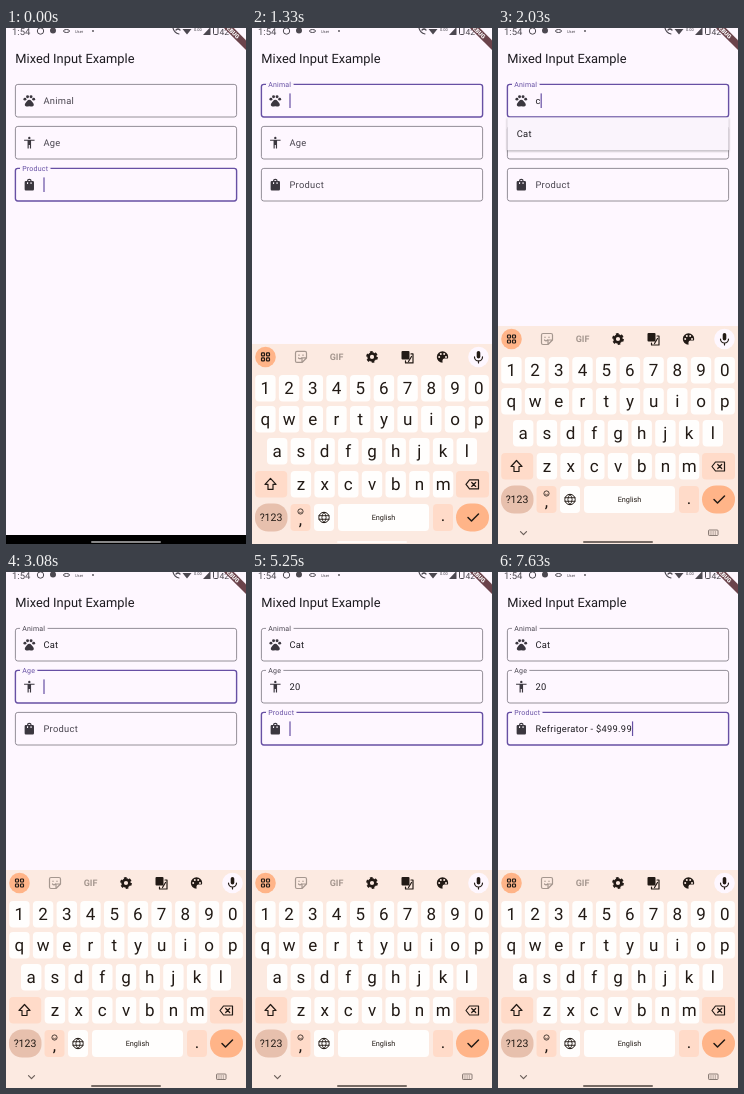
An HTML page that plays this animation: 240 by 516 pixels, repeating every 8050 ms.

```html
<!DOCTYPE html>
<html lang="en">
<head>
<meta charset="utf-8">
<title>Mixed Input Example</title>
<style>
html, body { margin: 0; width: 100%; height: 100%; overflow: hidden; background: #fef7ff; }
svg { display: block; width: 100%; height: 100%; font-family: Roboto, sans-serif; text-rendering: geometricPrecision; }
.body { font-size: 9.34px; letter-spacing: .29px; fill: #1d1b20; }
.mid { text-anchor: middle; }
.key { font-size: 17px; text-anchor: middle; fill: #221a15; }
.line { fill: none; stroke: #221a15; stroke-width: 1.2; stroke-linejoin: round; stroke-linecap: round; }
#menu rect { filter: drop-shadow(0 1px 1.2px #0005); }
</style>
</head>
<body>
<svg id="stage" viewBox="0 0 240 516"></svg>
<script>
const PAGE = '#fef7ff', PURPLE = '#6750a4', GREY = '#49454f', INK = '#221a15';
const KEY = '#fffefd', TONAL = '#ffdbc9', ORANGE = '#ffb488', PEACH = '#fceae1';
const LOOP = 8050, STEP = 70, TEXT_X = 37.4;

// Timelines are lists of [start, value].
const focusLine = [[-1000, 2], [1120, 0], [2940, 1], [4200, 2]];
const cursorOff = [[350, 770], [3360, 3570], [4760, 5250], [6090, 6230], [6580, 6930], [7140, 7560]];
const menus = [[1890, 2450, 0, 'Cat'], [5600, 6930, 2, 'Refrigerator - $499.99']];
const fields = [
  { name: 'Animal', typed: [[0, ''], [1820, 'c'], [2450, 'Cat']],
    icon: '<circle cx="4.5" cy="9.5" r="2.5"/><circle cx="9" cy="5.5" r="2.5"/><circle cx="15" cy="5.5" r="2.5"/><circle cx="19.5" cy="9.5" r="2.5"/><path d="M12 10.5c-3 0-4 3-6.5 5.5-2 2-1.5 6 1.5 6 1.5 0 3-.5 5-.5s3.5.5 5 .5c3 0 3.5-4 1.5-6-2.5-2.500-3.500-5.500-6.500-5.500z"/>' },
  { name: 'Age', typed: [[0, ''], [3570, '2'], [3780, '20']],
    icon: '<circle cx="12" cy="4" r="2"/><path d="M21 9h-6v13h-2v-6h-2v6H9V9H3V7h18z"/>' },
  { name: 'Product', typed: [[0, ''], [5530, 'r'], [6230, 're'], [6930, 'Refrigerator - $499.99']],
    icon: '<path d="M18 6h-2a4 4 0 0 0-8 0H6a2 2 0 0 0-2 2v12a2 2 0 0 0 2 2h12a2 2 0 0 0 2-2V8a2 2 0 0 0-2-2zM12 4a2 2 0 0 1 2 2h-4a2 2 0 0 1 2-2zM10 10a1 1 0 0 1-2 0V8h2zM16 10a1 1 0 0 1-2 0V8h2z" fill-rule="evenodd"/>' }
];

const rect = (x, y, w, h, fill, r = 0, more = '') =>
  `<rect x="${x}" y="${y}" width="${w}" height="${h}" rx="${r}" fill="${fill}" ${more}/>`;
const dot = (x, y, r, fill, more = '') => `<circle cx="${x}" cy="${y}" r="${r}" fill="${fill}" ${more}/>`;
const label = (x, y, s, more = 'class="body"') => `<text x="${x}" y="${y}" ${more}>${s}</text>`;
const line = (d, more = '') => `<path class="line" d="${d}" ${more}/>`;
const fieldY = i => 56.4 + 42 * i;

function statusBar() {
  const c = '#4c4850', small = `font-size="4" fill="${c}"`;
  return label(6, 7, '1:54', `font-size="9.5" fill="${c}"`) +
    dot(34.5, 3, 3.2, 'none', `stroke="${c}"`) + dot(47, 2.5, 3, c) +
    `<ellipse cx="60.5" cy="3" rx="3" ry="1.5" fill="none" stroke="${c}"/>` +
    label(69, 4.5, 'User', small) + dot(87, 3, .9, c) +
    line('M167 0q1 5 6 6M170 2q2-2 4 0', `style="stroke:${c}"`) +
    `<path d="M176.5 1h9l-4.5 5.5zM197 7h7.5V-1z" fill="${c}"/>` +
    label(188, 3, '0.00', small) +
    rect(207.5, -1, 4.5, 7.5, 'none', 1, `stroke="${c}"`) +
    label(213.5, 6.5, '42', `font-size="8.5" fill="${c}"`) +
    '<g transform="translate(240 -11) rotate(45)">' + rect(-24, 16.4, 48, 7, '#6b434b') +
    label(0, 22, 'DEBUG', 'class="mid" font-size="5.8" font-weight="900" fill="#fff"') + '</g>';
}

function fieldMarkup({ name, icon }, i) {
  const y = fieldY(i);
  return rect(9.4, y, 221.2, 32.6, 'none', 2.4, `id="box${i}"`) +
    rect(14, y - 1.2, 0, 2.4, PAGE, 0, `id="gap${i}"`) +
    `<g transform="translate(16.3 ${y + 9.2}) scale(.584)" fill="#3b373f">${icon}</g>` +
    `<text class="body" id="label${i}">${name}</text>` +
    label(TEXT_X, y + 19.4, '', `class="body" id="value${i}"`);
}

function keyRow(chars, x, y) {
  return [...chars].map((c, i) => {
    const cx = x + 23.7 * i;
    return rect(cx - 10.2, y - 13, 20.4, 26.5, KEY, 4) + label(cx, y + 5.8, c, 'class="key"');
  }).join('');
}

function toolRow() {
  const fade = 'style="stroke:#a5978f"';
  const squares = [[9.5, 307], [14.5, 307], [9.5, 312], [14.5, 312]];
  const wells = [[187.2, 311], [188.8, 308], [192.2, 308], [194, 311]];
  return dot(13.5, 311, 10.3, ORANGE) +
    squares.map(([x, y]) => rect(x, y, 3, 3, 'none', .8, `stroke="${INK}" stroke-width="1.2"`)).join('') +
    line('M45 305.5h8q1.5 0 1.5 1.5v5l-4.5 4.5h-5q-1.5 0-1.5-1.5v-8q0-1.5 1.5-1.5M54 312h-4v4M47 309v.5M51 309v.5M46.5 312q1.5 1.5 3 0', fade) +
    label(84.5, 314.2, 'GIF', 'class="mid" font-size="9" font-weight="700" fill="#a5978f"') +
    dot(120, 311, 3.4, 'none', `stroke="${INK}" stroke-width="2.6"`) +
    dot(120, 311, 4.9, 'none', `stroke="${INK}" stroke-width="2" stroke-dasharray="2.6 2.53"`) +
    rect(149.5, 305, 8, 8.5, INK, 1) + line('M159 308h2v9h-7.5v-2M156.5 315.5l3-5') +
    dot(190.5, 311, 5.7, INK) + wells.map(([x, y]) => dot(x, y, 1, PEACH)).join('') +
    `<path d="M190.5 317.5v-3q0-2 2-2h4v5z" fill="${PEACH}"/>` +
    dot(226.5, 311, 10.3, PAGE) + rect(224.7, 305, 3.6, 7.5, INK, 1.8) +
    line('M222.5 311a4 4 0 0 0 8 0M226.5 315v2');
}

function keyboard() {
  return rect(0, 298, 240, 240, PEACH) + toolRow() +
    keyRow('1234567890', 13.4, 342) + keyRow('qwertyuiop', 13.4, 373) +
    keyRow('asdfghjkl', 25.2, 405) + keyRow('zxcvbnm', 48.9, 438) +
    rect(3.2, 425, 32, 26.5, TONAL, 4) + line('M18.5 432.5l5.5 6h-3v5h-5v-5h-3z') +
    rect(204, 425, 33, 26.5, TONAL, 4) + line('M214 438.5l3.5-4.5h9v9h-9zM219.7 436.5l4 4M223.7 436.5l-4 4') +
    rect(3, 457.5, 32.5, 28, '#e7c0ad', 13) + label(19, 475, '?123', 'class="mid" font-size="10.5" fill="#221a15"') +
    rect(38.5, 458, 20, 27, TONAL, 4) + dot(48.5, 465.5, 2.6, 'none', `stroke="${INK}" stroke-width=".8"`) +
    line('M47.2 466.2q1.3 1.2 2.6 0', 'style="stroke-width:.6"') + label(48.5, 479, ',', 'class="key"') +
    rect(62, 458, 20, 27, KEY, 4) + dot(72, 471.5, 5.2, 'none', `stroke="${INK}"`) +
    line('M67 469.7h10M67 473.3h10M72 466.3q-4.5 5.2 0 10.4M72 466.3q4.5 5.2 0 10.4', 'style="stroke-width:.9"') +
    rect(86, 458, 91, 27, KEY, 4) + label(131.5, 474, 'English', 'class="mid" font-size="7.3" fill="#221a15"') +
    rect(181, 458, 20, 27, TONAL, 4) + label(191, 475.5, '.', 'class="key"') +
    rect(204, 457.5, 33, 28, ORANGE, 14) + line('M216 471.5l3.5 3.5 7-7', 'style="stroke-width:1.5"') +
    line('M22.5 503.7l3 3 3-3', 'style="stroke:#6b5f59"') +
    rect(210.5, 502, 9.5, 5.5, 'none', .8, 'stroke="#6b5f59" stroke-width=".8"') +
    line('M212 504h7M212 506h7', 'style="stroke:#6b5f59;stroke-width:.8;stroke-dasharray:.3 1.5"');
}

const $ = id => document.getElementById(id);
const set = (id, attrs) => { for (const k in attrs) $(id).setAttribute(k, attrs[k]); };
const show = (id, on) => { $(id).style.display = on ? '' : 'none'; };
const clamp = v => Math.max(0, Math.min(1, v));
const lastIndex = (list, t) => list.filter(e => e[0] <= t).length - 1;

$('stage').innerHTML = rect(0, 0, 240, 516, PAGE) + statusBar() +
  label(9.3, 34.5, 'Mixed Input Example', 'font-size="12.85" fill="#1d1b20"') +
  fields.map(fieldMarkup).join('') + rect(0, 0, 1.2, 14.6, PURPLE, 0, 'id="cursor"') +
  '<g id="menu">' + rect(9.3, 0, 221.4, 32.8, '#faf4fc') + label(18.7, 19.4, '', 'class="body" id="option"') + '</g>' +
  rect(0, 507, 240, 9, '#000', 0, 'id="navBar"') +
  `<g id="keyboard">${keyboard()}</g>` + rect(85, 513, 70, 2, '#888', 1, 'id="handle"');

function draw(t) {
  const n = lastIndex(focusLine, t);
  const [since, active] = focusLine[n];
  const before = n ? focusLine[n - 1][1] : -1;
  const rise = clamp((t - since + 70) / 140);

  fields.forEach((f, i) => {
    const value = f.typed[lastIndex(f.typed, t)][1], y = fieldY(i), on = active === i;
    const p = value ? 1 : on ? rise : before === i ? 1 - rise : 0;
    $('value' + i).textContent = value;
    set('box' + i, { stroke: on ? PURPLE : '#79747e', 'stroke-width': on ? 1.4 : .8 });
    set('label' + i, {
      transform: `translate(${TEXT_X - 21.2 * p} ${y + 19.4 - 16.9 * p}) scale(${1 - .25 * p})`,
      style: `fill:${on ? PURPLE : GREY}`
    });
    set('gap' + i, { width: p * ($('label' + i).getComputedTextLength() * .75 + 4.5) });
  });

  const typed = $('value' + active);
  const width = typed.textContent ? typed.getComputedTextLength() : 0;
  set('cursor', { x: TEXT_X + width, y: fieldY(active) + 9 });
  show('cursor', !cursorOff.some(([a, b]) => t >= a && t < b));

  const menu = menus.find(([a, b]) => t >= a && t < b);
  show('menu', menu);
  if (menu) {
    set('menu', { transform: `translate(0 ${fieldY(menu[2]) + 33})` });
    $('option').textContent = menu[3];
  }

  const drop = 218 * (1 - clamp((t - 1147) / 324)) ** 3;
  set('keyboard', { transform: `translate(0 ${drop})` });
  show('navBar', t < 1190);
  set('handle', { fill: t < 1190 ? '#888' : t < 1610 ? '#fffaf7' : '#776b65' });
}

const begin = performance.now();
function tick() {
  const t = (performance.now() - begin) % LOOP;
  draw(Math.floor(t / STEP) * STEP);
  requestAnimationFrame(tick);
}
tick();
</script>
</body>
</html>
```
